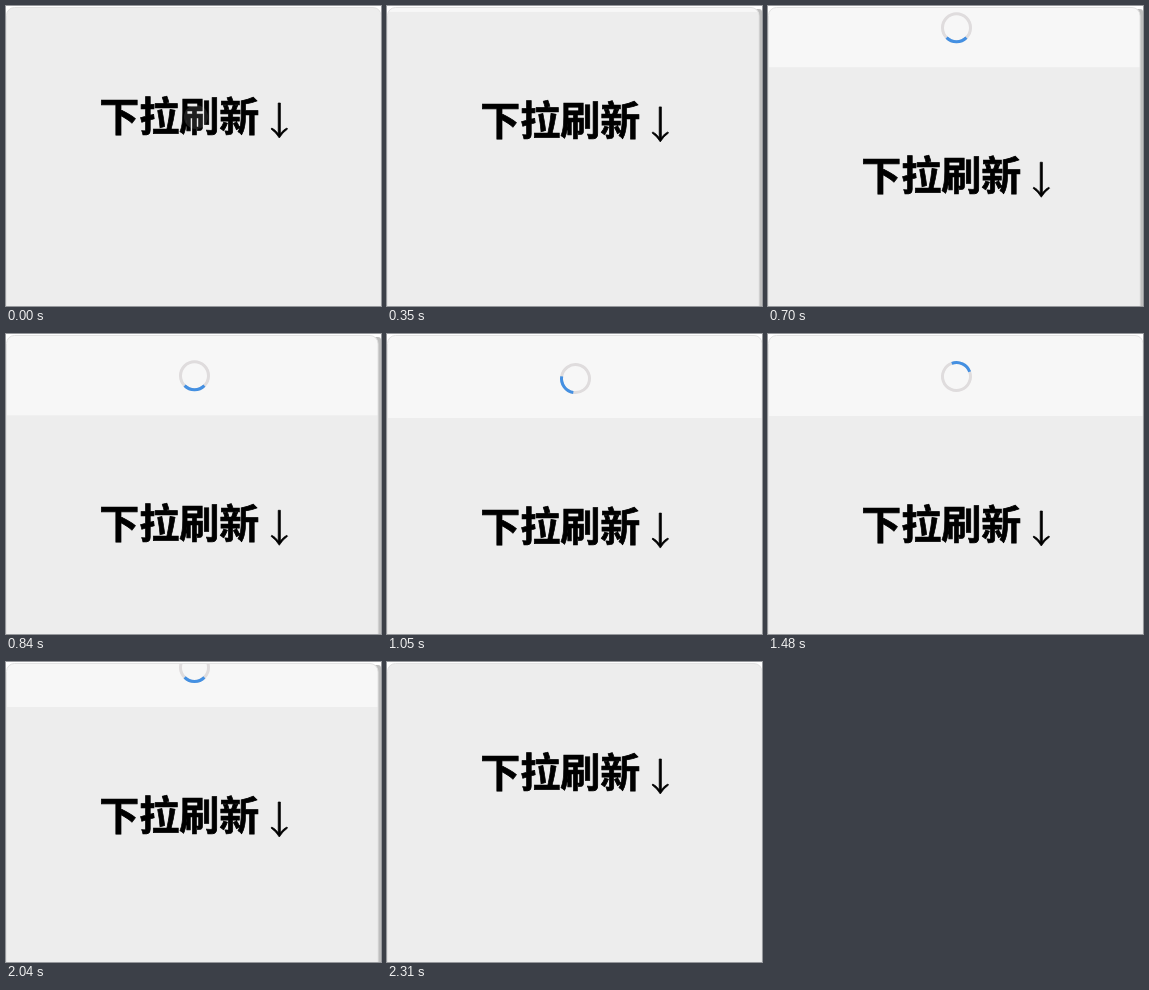
An HTML page for the animation above (2870 ms loop, 375 by 300 pixels).

```html
<!DOCTYPE html>
<html lang="zh">
<head>
<meta charset="utf-8">
<style>
  html, body { margin: 0; height: 100%; overflow: hidden; background: #fff; }
  svg { display: block; width: 375px; height: 300px; }
  text { font: bold 40px "Noto Sans CJK SC", "Noto Sans CJK", sans-serif; }
  .label { stroke: #000; stroke-width: .7; }
</style>
</head>
<body>
<svg viewBox="0 0 375 300">
  <clipPath id="clip"><rect class="card" x=".5" y="1.5" width="374.5" height="320" rx="8"/></clipPath>
  <rect id="bar" x="366" y="3" width="9" height="320" rx="3" fill="#bebebe"/>
  <g clip-path="url(#clip)">
    <rect width="375" height="300" fill="#f7f7f7"/>
    <g id="content">
      <rect y="2" width="375" height="300" fill="#ededed"/>
      <g id="spinner" fill="none" stroke-width="3">
        <circle cx="188.5" cy="-37.5" r="14" stroke="#dfdcdd"/>
        <path d="M198.4-27.6A14 14 0 0 1 178.6-27.6" stroke="#4490e2"/>
      </g>
      <g class="label">
        <text x="93.2" y="124.7">下拉刷新</text>
        <path d="M272.200 97h2.200v30.500q3-4 6.400-5.500l.8 1q-5 3.500-8.300 9q-3.300-5.500-8.300-9l.8-1q3.400 1.500 6.400 5.500z"/>
      </g>
      <circle id="touch" cx="190" cy="111" r="12" fill="#ededed" opacity=".13"/>
    </g>
  </g>
  <rect class="card" x=".5" y="1.5" width="374.5" height="320" rx="8" fill="none" stroke="#e2e2e2"/>
</svg>
<script>
const LOOP = 2870, STEP = 70;
const RELEASE = 915, RETRACT = 1920, SETTLE = 400, REST = 80, PULL = 86;
const $ = id => document.getElementById(id);
const clamp = v => Math.min(1, Math.max(0, v));
const smooth = p => p * p * (3 - 2 * p);

// CSS "ease": cubic-bezier(.25, .1, .25, 1)
function ease(x) {
  if (x <= 0 || x >= 1) return clamp(x);
  const bezier = (a, b, s) => 3 * a * s * (1 - s) ** 2 + 3 * b * s * s * (1 - s) + s ** 3;
  let lo = 0, hi = 1;
  for (let i = 0; i < 20; i++) {
    const mid = (lo + hi) / 2;
    if (bezier(.25, .25, mid) < x) lo = mid; else hi = mid;
  }
  return bezier(.1, 1, lo);
}

const drag = t => PULL * smooth(clamp((t - 260) / 700));

function offset(t) {
  if (t < RELEASE) return drag(t);
  if (t < RETRACT) return REST + (drag(RELEASE) - REST) * (1 - ease((t - RELEASE) / SETTLE));
  return t < 2310 ? REST * (1 - ease((t - RETRACT) / SETTLE)) : 0;
}

function draw(now) {
  const t = Math.floor(now % LOOP / STEP) * STEP;
  const moving = t >= 280 && t < RELEASE || t > RETRACT && t < 2310;
  $("content").setAttribute("transform", `translate(0 ${offset(t).toFixed(2)})`);
  $("spinner").setAttribute("transform", `rotate(${360 * clamp((t - 900) / 1000)} 188.5 -37.5)`);
  $("touch").style.display = t < STEP ? "" : "none";
  $("bar").style.display = moving ? "" : "none";
  for (const card of document.querySelectorAll(".card")) card.setAttribute("width", moving ? 371.5 : 374.5);
  requestAnimationFrame(() => draw(performance.now()));
}
draw(0);
</script>
</body>
</html>
```
